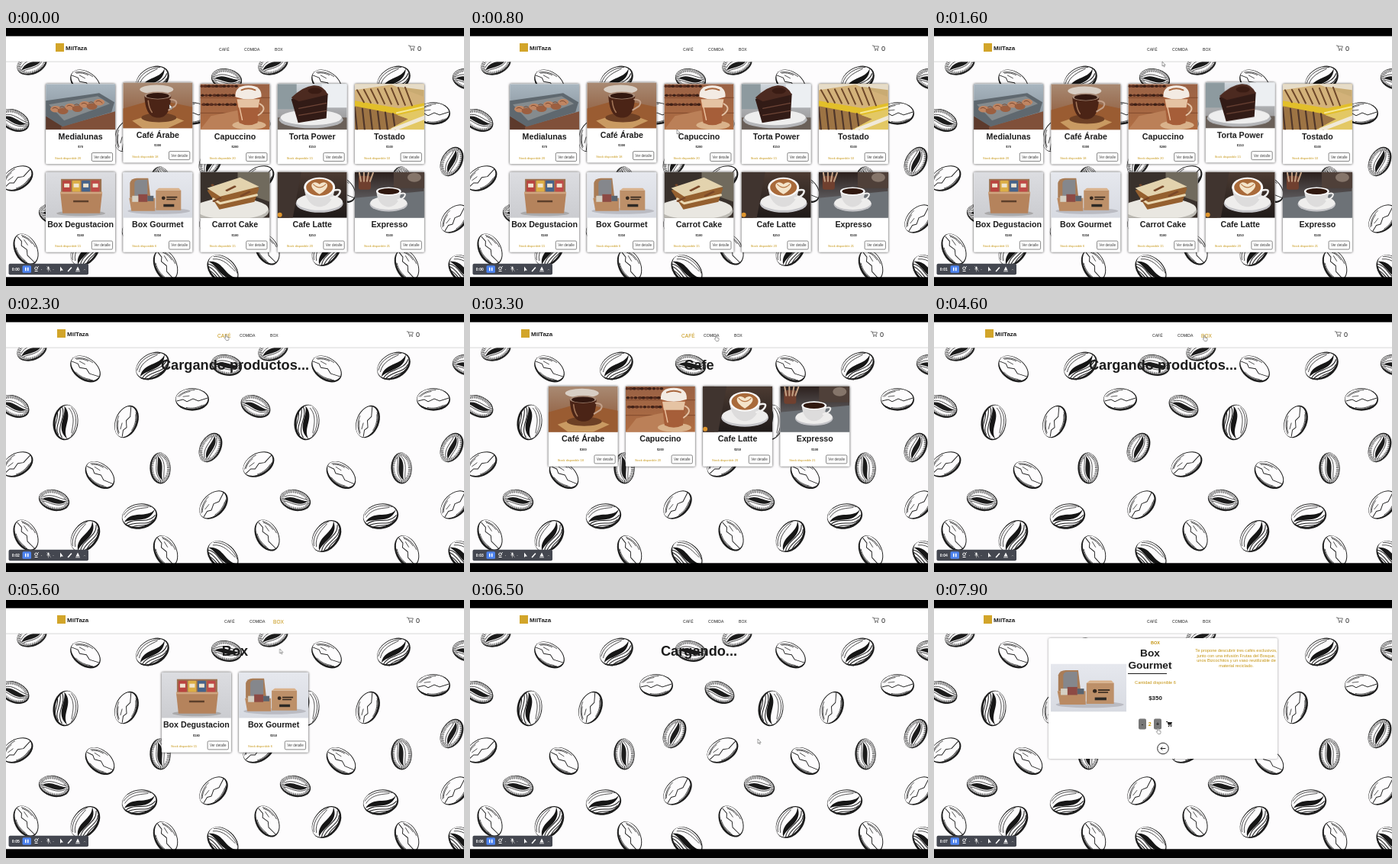
Recreate the animation shown at these times as an HTML page. Size 600x338 px, loop 8000 ms.

```html
<!DOCTYPE html>
<html lang="es">
<head>
<meta charset="utf-8">
<title>Cafetería</title>
<style>
html, body { margin: 0; width: 100%; height: 100%; overflow: hidden; background: #000; }
svg { display: block; }
#stage { width: 100%; height: 100%; font-family: "Liberation Sans", Arial, sans-serif; }
.panel { fill: #fff; filter: drop-shadow(0 .4px 1.8px #000c); }
.soft { fill: #fff; filter: drop-shadow(0 .5px 1.5px #0006); }
.line { fill: none; stroke: #222; stroke-width: .8; stroke-linecap: round; stroke-linejoin: round; }
.second { opacity: 0; animation: second 8s step-end infinite; }
#pointer { animation: pointer 8s ease-in-out infinite; }
@keyframes second { 0% { opacity: 1; } 12.5%, 100% { opacity: 0; } }
@keyframes pointer {
  0% { transform: translate(214px, 100px); }
  10%, 10.5% { transform: translate(271px, 133px); }
  15.5% { transform: translate(385px, 118px); }
  20% { transform: translate(299px, 44px); }
  23%, 33% { transform: translate(287px, 27px); }
  40%, 52% { transform: translate(321px, 28px); }
  56.5%, 67% { transform: translate(353px, 28px); }
  76%, 87% { transform: translate(377px, 182px); }
  94%, 100% { transform: translate(292px, 168px); }
}
</style>
</head>
<body>
<svg id="stage" viewBox="0 0 600 338"></svg>
<script>
const GOLD = '#c4930f', INK = '#1c1c1c';
let css = '';

const rect = (x, y, w, h, fill, rx = 0) => `<rect x="${x}" y="${y}" width="${w}" height="${h}" rx="${rx}" fill="${fill}"/>`;
const oval = (x, y, rx, ry, fill) => `<ellipse cx="${x}" cy="${y}" rx="${rx}" ry="${ry}" fill="${fill}"/>`;
const shape = (d, fill) => `<path d="${d}" fill="${fill}"/>`;
const line = (d, color = '#222', width = .8) => `<path class="line" d="${d}" style="stroke:${color};stroke-width:${width}"/>`;
const group = (x, y, body, extra = '') => `<g transform="translate(${x} ${y}) ${extra}">${body}</g>`;
const text = (x, y, size, str, { fill = INK, bold = false, anchor = 'middle' } = {}) =>
  `<text x="${x}" y="${y}" font-size="${size}" fill="${fill}" text-anchor="${anchor}"${bold ? ' font-weight="700"' : ''}>${str}</text>`;
const bold = { bold: true };
const left = { anchor: 'start' };

// Visible between alternating on/off times in ms.
function shown(id, edges, body) {
  const steps = edges.map((ms, i) => `${ms / 80}%{opacity:${1 - i % 2}}`).join('');
  css += `@keyframes ${id}{${edges[0] ? '0%{opacity:0}' : ''}${steps}}#${id}{animation:${id} 8s step-end infinite}`;
  return `<g id="${id}">${body}</g>`;
}

// Raised while hovered between two times in ms.
function lifted(id, from, to, body) {
  const up = 'transform:translateY(-1.9px)', flat = 'transform:none';
  css += `@keyframes ${id}{0%{${from ? flat : up}}${from ? `${from / 80}%{${flat}}${(from + 100) / 80}%{${up}}` : ''}` +
    `${(to - 100) / 80}%{${up}}${to / 80}%,100%{${flat}}}#${id}{animation:${id} 8s linear infinite}`;
  return `<g id="${id}">${body}</g>`;
}

// Coffee beans on a repeating background.
const rim = oval(0, 0, 22, 15.5, '#1c1c1c') + oval(-.5, -.9, 20.9, 13.7, '#fdfcfd');
const beanKinds = {
  dark: rim + shape('M-20 4C-8-10 8 5 20-5C10 12-7 0-20 4Z', '#161616') +
    line('M-19 7C-8-1 8 12 19 2M-17 9C-6 4 8 14 16 7M-13 12C-4 8 5 15 11 11', '#222', 1) +
    line('M-19-5C-10-15 6-14 16-9M-18-2C-9-12 4-9 12-9', '#222', .7),
  light: rim + line('M-20 2L-12 0L-7 3L1-1L8 2L20-2', '#222', 1) +
    line('M-19-4C-12-11-5-13 3-13M-17-4C-12-9-8-10-3-11M-13 11C-3 15 8 13 16 7M-8 11C0 13 7 11 13 8M-12-4L-4-5', '#333', .8),
  hatched: rim + '<ellipse rx="19" ry="12.5" fill="none" stroke="#333" stroke-width="4.5" stroke-dasharray=".8 1.1"/>' +
    shape('M-17 3C-7-8 6 0 17-3C9 9-6 2-17 3Z', '#1c1c1c') +
    line('M-16-1C-7-10 6-4 15-5M-15 5C-6 4 6 10 16 1')
};
const beans = [
  ['hatched', 34, 47, -22], ['light', 104, 72, 35], ['dark', 192, 68, -30], ['hatched', 289, 67, 12],
  ['light', 244, 112, 0], ['hatched', 11, 121, 25], ['dark', 78, 142, 97],
  ['light', 158, 141, -68], ['hatched', 268, 175, -62], ['light', 15, 197, -30],
  ['hatched', 202, 202, 88], ['light', 123, 211, 40], ['hatched', 63, 244, 14],
  ['dark', 175, 265, -10], ['light', 272, 250, -45], ['light', 26, 290, 62],
  ['dark', 104, 291, -52], ['light', 209, 311, 65], ['dark', 284, 317, 42]
];
const bean = (kind, x, y, turn) =>
  group(x, y, beanKinds[kind], `rotate(${turn}) scale(${kind === 'hatched' ? '.93 .88' : kind === 'dark' ? '1.06' : '1 .95'})`);
const backdrop = rect(0, 10, 600, 317, '#fdfcfd') +
  [-316, 0, 316].map(dx => beans.map(([kind, x, y, turn]) => bean(kind, x + dx, y, turn)).join('')).join('');

// Product pictures, 91 by 60.
const blend = (id, top, bottom) => `<linearGradient id="${id}" x2="0" y2="1"><stop stop-color="${top}"/><stop offset="1" stop-color="${bottom}"/></linearGradient>`;
const gradients = blend('wall', '#a9b6c0', '#7b8790') + blend('warm', '#a98a73', '#8a5231') +
  blend('wood', '#9a6245', '#b06d42') + blend('pale', '#cfd6dc', '#8e8b8b') + blend('gray', '#dcdde1', '#cbccd0') +
  blend('night', '#4c3b32', '#1f1a19') + blend('dusk', '#2c201d', '#7d8288') + blend('cool', '#e6e8ee', '#d7dae1');
const whole = fill => rect(0, 0, 91, 60, fill);
const repeat = (n, draw) => Array.from({ length: n }, (_, i) => draw(i)).join('');
const cup = (x, y, drink, ry = 9) => oval(x, y + 21, 31, 12, '#c4c4c8') + oval(x, y + 19, 30, 11, '#eeedec') +
  shape(`M${x - 20} ${y}C${x - 18} ${y + 34} ${x + 18} ${y + 34} ${x + 20} ${y}Z`, '#dddcdc') +
  line(`M${x + 18} ${y + 4}q12 -3 8 4q-3 5 -11 6`, '#f0efee', 2.5) +
  oval(x, y, 20.5, ry, '#fafafa') + oval(x, y, 17.5, ry - 2, drink);

const photos = {
  medialunas: whole('url(#wall)') + shape('M0 42L30 60H0Z', '#5d3a2c') + shape('M20 56L91 36V60H20Z', '#80503a') +
    shape('M0 22L70 12L90 24L86 37L22 56L0 42Z', '#5f686f') + shape('M4 27L68 16L84 26L24 48Z', '#858b8e') +
    repeat(7, i => oval(13 + i * 9.5, 33 - i * 1.5 + i % 2 * 4, 7, 4.2, i % 2 ? '#9c5f40' : '#c08562') +
      line(`M${9 + i * 9.5} ${32 - i * 1.5}q4 -3 8 2`, '#7d4a31', 1)),
  arabe: whole('url(#warm)') + shape('M0 34L42 22L91 32V60H0Z', '#9a5c32') + oval(44, 9, 22, 6, '#d8cec4') +
    shape('M12 50L48 38L80 50L58 60H26Z', '#c99a62') + oval(47, 46, 23, 6, '#6d4025') +
    shape('M28 17H63C62 36 58 46 46 46S29 36 28 17Z', '#4b2416') + oval(45.5, 17, 17.5, 5, '#a88b78') +
    oval(45.5, 17.5, 15, 3.8, '#32170f') + line('M62 22q12 1 6 9l-8 5', '#c3a18a', 2) + line('M33 24q1 10 5 15', '#a37557', 1.6),
  capuccino: whole('url(#wood)') + line('M0 18H91M0 38H91', '#80492c', 1) + shape('M0 60L14 42L52 34L60 60Z', '#bb8058') +
    repeat(46, i => oval((i * 17) % 46 + 2, (i * 11) % 33 + 3 + i % 3, 2.4, 1.7, i % 2 ? '#3d2016' : '#5a2e1f')) +
    oval(64, 54, 22, 6, '#d9b28b') +
    shape('M46 13H80L75 51Q63 57 51 51Z', '#a65e39') + shape('M48 20H78L76 31H50Z', '#e5c3a3') +
    shape('M46 17Q45 2 63 2T80 17Q63 23 46 17Z', '#f3ebe3') + line('M54 8q9 -4 18 0', '#a8663d', 2) +
    line('M50 24L55 47', '#eac09d', 1.5) + line('M78 26q11 6 -2 15', '#e3c1a4', 2),
  torta: whole('url(#pale)') + rect(0, 0, 25, 33, '#8d9a9f') + rect(58, 0, 33, 31, '#eceff2') + rect(0, 44, 91, 16, '#6a6059') +
    oval(44, 47, 42, 11, '#b4b5b8') + oval(44, 44, 40, 10, '#eeeeee') +
    shape('M18 20L45 5L66 13L64 45L27 51Z', '#321b16') + shape('M18 18Q34 3 47 2T66 14L28 23Z', '#4c2a20') +
    line('M28 32L64 25M28 41L64 35', '#6d4436', 1.3) + oval(49, 9, 9, 4, '#3a1c14'),
  tostado: whole('#c9ab72') + shape('M0 0H91V8L60 4L0 10Z', '#e6dcc8') +
    shape('M0 8L48 1L91 17V27L58 33L0 22Z', '#d3b27a') + shape('M0 22L58 32L91 25V34L56 41L0 30Z', '#e2bf2a') +
    repeat(8, i => line(`M${3 + i * 9} ${8 - i * .5}L${12 + i * 9} ${24 + i * .6}`, '#6d4729', 2)) +
    shape('M0 29L52 39L70 46L44 60H0Z', '#9d7444') + repeat(6, i => line(`M${i * 10} ${31 + i * 1.6}L${i * 10 + 3} 60`, '#50372a', 2.2)) +
    shape('M56 41L91 33V60H44L70 46Z', '#e3c864') + line('M55 38L90 30', '#f6e795', 2) + line('M50 60L91 44', '#f0e9d8', 5),
  degustacion: whole('url(#gray)') + oval(46, 54, 32, 3.5, '#aaa9aa') + rect(20, 9, 53, 22, '#9c7150') +
    repeat(4, i => rect(22 + i * 12.5, 11, 11, 15, ['#b9443f', '#dcae45', '#46638a', '#bf4a47'][i], 1) +
      rect(24 + i * 12.5, 15, 7, 5, '#f0e4cf')) +
    shape('M19 26H74L71 54H22Z', '#b5835c') + shape('M19 26H74V28.5H19Z', '#cfa580') + rect(36, 37, 20, 2.5, '#5c3f2b'),
  gourmet: whole('url(#cool)') + oval(47, 51, 41, 4, '#babbc2') +
    shape('M9 14Q11 8 18 8H33L36 34H9Z', '#a97c56') + shape('M15 14Q16 10 21 10H32V34H15Z', '#85878c') +
    shape('M8 34H42V51H11Z', '#ba8a62') + rect(20, 29, 12, 10, '#8d4a44') + rect(12, 31, 8, 8, '#d5cfc2') + rect(32, 31, 8, 7, '#5a6470') +
    shape('M43 24H76V50H43Z', '#bd9069') + shape('M43 24L47 21H73L76 24Z', '#d9b18a') +
    oval(53, 34, 2.4, 2.4, '#35281e') + rect(57, 32, 14, 1.7, '#35281e') + rect(57, 35, 12, 1.5, '#35281e') + rect(53, 42, 14, 3.5, '#2d2925'),
  carrot: whole('#39312c') + shape('M49 0H91V39L49 24Z', '#706a5d') + oval(40, 51, 50, 16, '#bbb9b2') + oval(41, 48, 48, 14, '#e9e7e1') +
    shape('M9 24L52 10L77 21L71 39L25 49Z', '#95602f') + shape('M9 21L52 7L77 19L26 32Z', '#e3d3ae') +
    line('M17 35L26 41L74 30', '#ead8b2', 3) + repeat(18, i => oval(16 + (i * 19) % 55, 17 + (i * 7) % 22, 2, 1.3, '#7a4828')),
  latte: whole('url(#night)') + rect(0, 0, 15, 60, '#5e4636') + shape('M0 0H31L20 60H0Z', '#40342f') + oval(3, 56, 3, 3, '#df962e') +
    cup(55, 20, '#a96a3a', 13) + shape('M55 29C35 17 49 9 55 16C61 9 75 17 55 29Z', '#f4e4ca') + line('M47 16q8 8 16 0', '#b87745', 1.2),
  expresso: whole('url(#dusk)') + rect(51, 0, 40, 21, '#4f4039') + oval(78, 7, 9, 6, '#85756a') + shape('M0 34L91 25V60H0Z', '#6d7277') +
    rect(5, 5, 16, 18, '#70402f', 3) + repeat(4, i => line(`M${8 + i * 4} 12L${6 + i * 6} 1`, '#c4a184', 2)) +
    group(6, 6, cup(48, 24, '#30180f', 7), 'scale(.8)')
};
const photo = (name, x, y, w, h) =>
  `<svg x="${x}" y="${y}" width="${w}" height="${h}" viewBox="0 0 91 60" preserveAspectRatio="none">${photos[name]}</svg>`;

const products = {
  medialunas: ['Medialunas', 70, 20], arabe: ['Café Árabe', 300, 18], capuccino: ['Capuccino', 200, 20],
  torta: ['Torta Power', 150, 15], tostado: ['Tostado', 100, 10], degustacion: ['Box Degustacion', 180, 15],
  gourmet: ['Box Gourmet', 350, 6], carrot: ['Carrot Cake', 100, 15], latte: ['Cafe Latte', 250, 20], expresso: ['Expresso', 100, 21]
};
function card(name, x, y, hover) {
  const [title, price, stock] = products[name];
  const body = '<rect class="panel" width="91" height="105" rx="1.5"/>' + photo(name, 0, 0, 91, 60) +
    text(45.5, 72.3, 10.65, title, bold) + text(45.5, 84, 4, '$' + price, bold) +
    text(12, 98.3, 3.95, 'Stock disponible ' + stock, { fill: GOLD, ...left }) +
    '<rect x="60.2" y="90.2" width="27.3" height="11" rx="1.5" fill="#fff" stroke="#555" stroke-width=".7"/>' +
    text(73.9, 97.4, 4.6, 'Ver detalle', { fill: '#444' });
  return group(x, y, hover ? lifted('lift-' + name, ...hover, body) : body);
}
const row = (names, y, hovers = {}) =>
  names.map((name, i) => card(name, 300 - names.length * 50.6 + 5.1 + i * 101.2, y, hovers[name])).join('');
const heading = str => text(300, 73.3, 18.2, str, bold);

// Header: the active link is gold and larger.
const links = ['CAFÉ', 'COMIDA', 'BOX'];
function header(active, starts) {
  const shift = active < 0 ? 0 : 2;
  const nav = links.map((label, i) => i === active
    ? text(starts[i], 30.5, 6.6, label, { fill: GOLD, ...left })
    : text(starts[i], 30.3, 5.1, label, left)).join('');
  const cart = line('M527.2 23h1.6l1.6 4.4h3.8l1.2-3.4h-6', '#222', .6) + oval(531, 29, .8, .8, '#222') + oval(534, 29, .8, .8, '#222') +
    text(539, 30, 9, '0', left);
  return group(shift, 0, rect(65, 20, 11, 11, '#d2a52a') + text(78, 29.3, 8, 'MilTaza', { bold: true, ...left })) + nav + group(-shift, 0, cart);
}

const detail = '<rect class="soft" x="150" y="50" width="300" height="158" rx="2"/>' + photo('gourmet', 153, 83.5, 99, 63) +
  text(290, 57.6, 5.5, 'BOX', { fill: GOLD, bold: true }) + text(283, 74.2, 13.7, 'Box', bold) + text(283, 89.6, 13.7, 'Gourmet', bold) +
  rect(254, 96, 51, 1, INK) + text(290, 109.5, 5.6, 'Cantidad disponible 6', { fill: GOLD }) + text(290, 130.8, 7.9, '$350', bold) +
  ['Te propone descubrir tres cafés exclusivos,', 'junto con una infusión Frutas del Bosque,', 'unos Bizcochitos y un vaso reutilizable de', 'material reciclado.']
    .map((str, i) => text(396, 68 + i * 6.6, 5.6, str, { fill: GOLD })).join('') +
  rect(268, 155.5, 10, 14, '#777', 2) + rect(288, 155.5, 10, 14, '#777', 2) + text(273, 164.8, 7, '-', bold) + text(293, 164.8, 7, '+', bold) +
  shown('one', [6900, 7800], text(282.7, 165, 7, '1', { fill: GOLD, bold: true })) +
  shown('two', [7800, 8000], text(282.7, 165, 7, '2', { fill: GOLD, bold: true })) +
  line('M304.5 159.5h1.5l1.5 4.5h4', INK, 1) + shape('M306 160H312L311 163H307Z', INK) + oval(307.5, 165.5, .8, .8, INK) + oval(310.5, 165.5, .8, .8, INK) +
  '<circle cx="300" cy="194.5" r="7.3" fill="#fff" stroke="#222"/>' + line('M303 194.5H297M299 192.7L297 194.5L299 196.3', INK, 1);

const clock = repeat(8, i => `<g class="second" style="animation-delay:${i - 8}s">${text(8.3, 318.2, 5, '0:0' + i, { fill: '#fff', bold: true, ...left })}</g>`);
const recorder = group(-.5, -.5, rect(4, 309.3, 104.5, 14.4, '#444750', 2) + clock + rect(22, 311.8, 11.5, 9.4, '#4c82ee', 1.5) +
  rect(25.5, 314.2, 1.5, 4.5, '#fff') + rect(28.5, 314.2, 1.5, 4.5, '#fff') +
  '<circle cx="40" cy="315.3" r="1.8" fill="none" stroke="#fff"/>' + line('M38.5 319h3.2M42 314l1-1', '#fff', 1) +
  rect(55, 313, 2, 4, '#fff', 1) + line('M54 316q2 4 4 0M56 318v1.5M54 313l5 6', '#ccc', .6) +
  oval(47, 317, .6, .6, '#aaa') + oval(62.5, 317, .6, .6, '#aaa') + shape('M71.5 313V319.5L73 318L75.5 318Z', '#fff') +
  line('M82 319L86 314.5', '#fff', 1.6) + shape('M94.5 313L97 318H92Z', '#fff') + line('M92 319.3H97', '#fff', .8) +
  line('M102.5 317.5l1-1l1 1', '#aaa', .6));

const arrow = '<path d="M0 0V6L1.4 4.8L2.4 7L3.3 6.6L2.4 4.5H4.2Z" fill="#fff" stroke="#444" stroke-width=".5"/>';
const hand = '<path d="M.5 .5Q1.4 -.3 2 .6V3L5 3.7V6L4.3 7.5H1.5L-.7 4.6Q-.3 3.6 .5 4.3Z" fill="#fff" stroke="#444" stroke-width=".5"/>';

const scene = `<defs>${gradients}</defs>` + rect(0, 0, 600, 338, '#000') + backdrop +
  rect(0, 10, 600, 34, '#fff') + rect(0, 43.7, 600, .7, '#c9c9c9') +
  shown('nav-plain', [0, 1900, 6200, 8000], header(-1, [279, 312, 352])) +
  shown('nav-cafe', [1900, 3400], header(0, [277, 306, 346])) +
  shown('nav-food', [3400, 4600], header(1, [284, 308, 347])) +
  shown('nav-box', [4600, 6200], header(2, [286, 319, 350])) +
  shown('home', [0, 1900],
    row(['medialunas', 'arabe', 'capuccino', 'torta', 'tostado'], 73.3, { arabe: [0, 950], capuccino: [950, 1200], torta: [1150, 1750] }) +
    row(['degustacion', 'gourmet', 'carrot', 'latte', 'expresso'], 188.8)) +
  shown('loading', [1900, 2600, 3400, 4100, 4600, 5300], heading('Cargando productos...')) +
  shown('coffees', [2600, 3400], heading('Cafe') + row(['arabe', 'capuccino', 'latte', 'expresso'], 94.7)) +
  shown('foods', [4100, 4600], heading('Comida') + row(['medialunas', 'torta', 'tostado', 'carrot'], 94.7)) +
  shown('boxes', [5300, 6200], heading('Box') + row(['degustacion', 'gourmet'], 94.7, { gourmet: [5800, 6300] })) +
  shown('waiting', [6200, 6900], heading('Cargando...')) +
  shown('detail', [6900, 8000], detail) +
  rect(0, 0, 600, 10.7, '#000') + rect(0, 326.3, 600, 12, '#000') + recorder +
  `<g id="pointer">${shown('arrow', [0, 1750, 5400, 6000, 6200, 7500], arrow)}${shown('hand', [1750, 5400, 6000, 6200, 7500, 8000], hand)}</g>`;

document.head.insertAdjacentHTML('beforeend', `<style>${css}</style>`);
document.getElementById('stage').innerHTML = scene;
</script>
</body>
</html>
```
